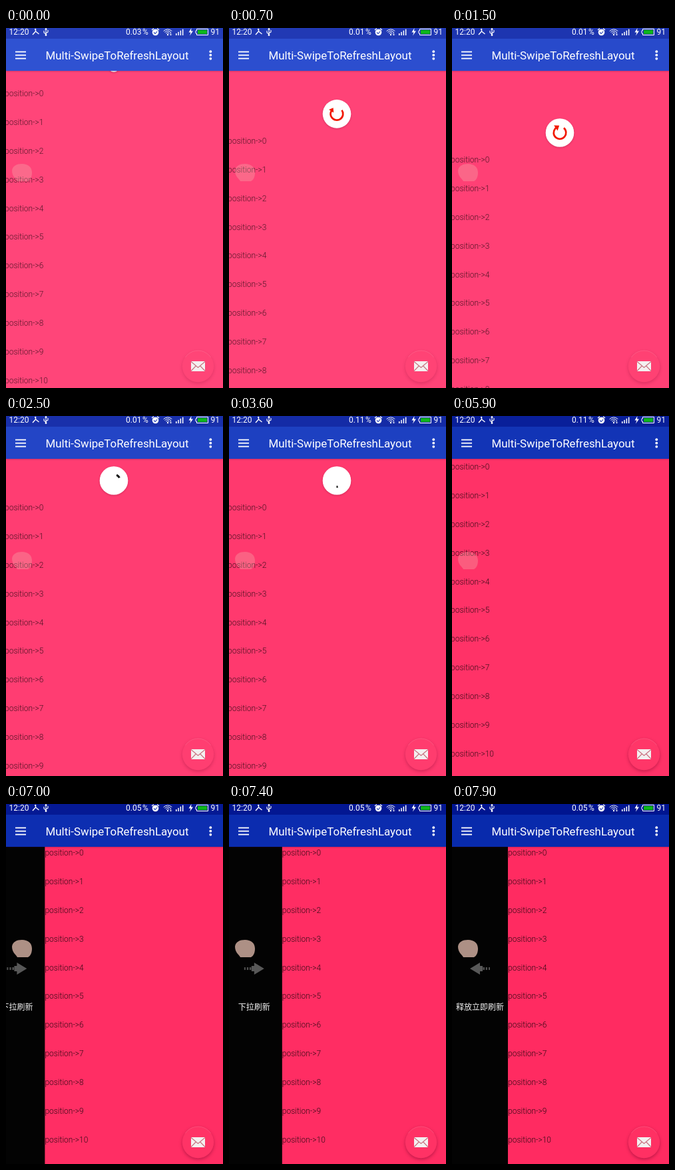
Recreate the animation shown at these times as an HTML page with a canvas. Size 326 by 538 pixels, loop 8000 ms.

```html
<!DOCTYPE html>
<html lang="en">
<head>
<meta charset="utf-8">
<title>Multi-SwipeToRefreshLayout</title>
<style>
  html, body { margin: 0; width: 100%; height: 100%; overflow: hidden; background: #ff4477; }
  canvas { display: block; width: 326px; height: 538px; }
</style>
</head>
<body>
<canvas></canvas>
<script>
const W = 326, H = 538, LOOP = 8000, STEP = 100, TAU = Math.PI * 2, DEG = Math.PI / 180;
const BAR = 64, ROW = 42.83, HEADER = 64, PANEL = 84;
const SPIN_START = 2370, SPIN_END = 4600, SPIN_CYCLE = 1333;
const canvas = document.querySelector('canvas');
const dpr = window.devicePixelRatio || 1;
canvas.width = W * dpr;
canvas.height = H * dpr;
const c = canvas.getContext('2d');

const clamp = v => Math.max(0, Math.min(1, v));
const span = (t, a, b) => clamp((t - a) / (b - a));
const lerp = (a, b, k) => a + (b - a) * k;
const easeOut = (x, power = 2) => 1 - (1 - x) ** power;
const smooth = x => x * x * (3 - 2 * x);
const blend = (from, to, k) => `rgb(${from.map((v, i) => Math.round(lerp(v, to[i], k)))})`;

function text(str, x, y, font, color = '#fff', align = 'left', family = 'Roboto, sans-serif') {
  c.font = `${font} ${family}`;
  c.textAlign = align;
  c.fillStyle = color;
  c.fillText(str, x, y);
}
function rect(x, y, w, h, color) {
  c.fillStyle = color;
  c.fillRect(x, y, w, h);
}
function disc(x, y, r, color) {
  c.fillStyle = color;
  c.beginPath();
  c.arc(x, y, r, 0, TAU);
  c.fill();
}
function arc(x, y, r, a, b, width, color) {
  c.strokeStyle = color;
  c.lineWidth = width;
  c.beginPath();
  c.arc(x, y, r, a * DEG, b * DEG);
  c.stroke();
}
function shape(d, fill, stroke, width = 1) {
  const path = new Path2D(d);
  if (fill) { c.fillStyle = fill; c.fill(path); }
  if (stroke) { c.strokeStyle = stroke; c.lineWidth = width; c.stroke(path); }
}
function withShadow(color, blur, dy, draw) {
  c.save();
  c.shadowColor = color;
  c.shadowBlur = blur * dpr;
  c.shadowOffsetY = dy * dpr;
  draw();
  c.restore();
}

// Vertical distance of the list from its resting place
function pullDown(t) {
  if (t < 2000) return lerp(25, 124, easeOut(span(t, 0, 1500)));
  if (t < 4900) return lerp(124, HEADER, smooth(span(t, 2000, 2350)));
  if (t < 5600) return HEADER * (1 - easeOut(span(t, 4900, 5100)));
  return 3 * Math.sin(Math.PI * span(t, 5650, 6150));
}

// Left edge of the list
const pullRight = t => lerp(-2, PANEL, easeOut(span(t, 6350, 7600), 1.65));

function drawArrowRing(pull) {
  const k = clamp(pull / 110);
  const end = 235 - (1 - k) * 180;
  arc(0, 0, 9.3, end - 285 * k, end, 2.7, '#f21800');
  c.save();
  c.rotate(end * DEG);
  c.translate(9.3, 0);
  c.scale(k, k);
  shape('M-4.8 -1H4.8L0 5.5Z', '#f21800');
  c.restore();
}

function drawSpinner(t) {
  const cycles = (Math.min(t, SPIN_END) - SPIN_START) / SPIN_CYCLE;
  const u = cycles % 1, turn = Math.floor(cycles);
  const ease = x => 1 - (1 - clamp(x) ** 2) ** 3;
  const base = -90 + 270 * cycles + 288 * turn;
  arc(0, 0, 9.3, base + 288 * ease(2 * u - 1), base + 288 * ease(2 * u) + 6, 3, '#111');
}

// The disc sits in the middle of the strip above the list
function drawRefreshHeader(t, pull) {
  const scale = clamp(pull / HEADER);
  if (scale < 0.06) return;
  c.save();
  c.translate(162, pull - HEADER / 2 + 0.5);
  c.scale(scale, scale);
  withShadow('rgba(90,0,30,.25)', 3, 1, () => disc(0, 0, 21.3, '#fff'));
  if (t < SPIN_START) drawArrowRing(pull);
  else drawSpinner(t);
  c.restore();
}

function drawSidePanel(t, x) {
  if (x <= 0) return;
  rect(0, BAR, x, H - BAR, '#030303');
  const mid = x - PANEL / 2, flip = span(t, 7400, 7600);
  c.save();
  c.translate(mid, 246);
  c.rotate(Math.PI * flip);
  shape('M15 0L0 -9V-4H-4V4H0V9Z', '#585858');
  [-7, -11, -15].forEach((dx, i) => rect(dx, -2, 2.6 - i * 0.3, 4, '#505050'));
  c.restore();
  text(flip > 0 ? '释放立即刷新' : '下拉刷新', mid, 308, '12px', '#f4f4f4', 'center',
    '"Noto Sans CJK SC", "Noto Sans CJK", sans-serif');
}

function drawList(t, k) {
  const x = pullRight(t), pull = pullDown(t);
  rect(0, BAR, W, H - BAR, blend([255, 69, 121], [255, 43, 97], k));
  drawSidePanel(t, x);
  c.save();
  c.translate(0, BAR);
  drawRefreshHeader(t, pull);
  const ink = `rgba(0,0,0,${lerp(0.66, 0.8, k)})`;
  for (let i = 0; i < 12; i++) text('position->' + i, x, 13.3 + pull + i * ROW, '300 12px', ink);
  c.restore();
}

function drawFloatingBlob(x) {
  const alpha = lerp(0.28, 0.72, clamp((x - 10) / 30));
  shape('M9 213C10 206 16 203 24 203C33 203 39 208 39 216C39 222 37 227 33 229H17C15 225 9 222 9 213Z',
    `rgba(240,200,185,${alpha})`);
}

function drawMailButton(k) {
  const color = blend([255, 69, 119], [255, 48, 99], k);
  withShadow(`rgba(110,0,40,${lerp(0.2, 0.45, k)})`, 5, 2, () => disc(288.5, 505.5, 23.7, color));
  arc(288.5, 505.5, 23.4, 215, 325, 0.6, 'rgba(255,150,175,.45)');
  rect(278, 498, 21, 15, '#f3f0f0');
  shape('M278 498.5L288.5 507.5L299 498.5M278 512.5L285.3 505M299 512.5L291.7 505', null, '#c9707f', 1.1);
}

function drawStatusIcons() {
  shape('M44.5 1V5L40 10M44.5 5L49.5 9M43 2H45', null, '#fff', 1.4);
  shape('M60 1V11M57 4V7L60 9M63 3V6L60 8', null, '#fff', 1.1);
  shape('M60 -.5L62 2.5H58Z', '#fff');
  disc(60, 10.5, 1.4, '#fff');

  disc(224.5, 6.5, 4.8, '#fff');
  shape('M219 3L222 .8M230 3L227 .8', null, '#fff', 1.4);
  shape('M222 6.5L224.2 8.5L227.2 5', null, '#2440b4', 1.1);

  [8.5, 6, 3.5].forEach(r => arc(243, 10.5, r, 222, 318, 1, '#fff'));
  disc(243, 10, 1.2, '#fff');
  shape('M247.5 6V11M246 9.5L247.5 11L249 9.5', null, '#fff', 0.8);

  for (let i = 0; i < 4; i++) rect(255 + i * 3.3, 8 - i * 2.1, 1.5, 3 + i * 2.1, '#fff');
  shape('M278.5 0L274.5 6.5H277.5L276 11.5L281 4.5H278Z', '#fff');
  shape('M286.5 1.5H303.5V10.5H286.5V8H285V4H286.5Z', null, '#fff', 1);
  rect(288, 3, 14, 6, '#0cb51c');
}

function drawBars(t, k) {
  const usage = t < 500 ? '0.03' : t < 3500 ? '0.01' : t < 6500 ? '0.11' : '0.05';
  withShadow('rgba(60,0,50,.25)', 2, 0.5, () =>
    rect(0, 0, W, BAR, blend([47, 82, 210], [8, 41, 172], k)));
  rect(0, 0, W, 16, blend([36, 61, 184], [0, 20, 143], k));
  text('12:20', 4.5, 10.3, '12px');
  text(usage, 180, 10.3, '12px');
  text('%', 205, 10.3, '12px');
  text('91', 307.5, 10.3, '12px');
  drawStatusIcons();
  for (let i = 0; i < 3; i++) {
    rect(14, 34.7 + i * 5, 16, 1.8, '#fff');
    disc(307.3, 35.2 + i * 5.3, 1.9, '#fff');
  }
  text('Multi-SwipeToRefreshLayout', 59.5, 47, '16.9px');
}

function render(t) {
  const k = t / LOOP;
  c.setTransform(dpr, 0, 0, dpr, 0, 0);
  drawList(t, k);
  drawFloatingBlob(pullRight(t));
  drawMailButton(k);
  drawBars(t, k);
}

const start = performance.now();
function tick() {
  const t = (performance.now() - start) % LOOP;
  render(Math.floor(t / STEP) * STEP);
  requestAnimationFrame(tick);
}
tick();
</script>
</body>
</html>
```
